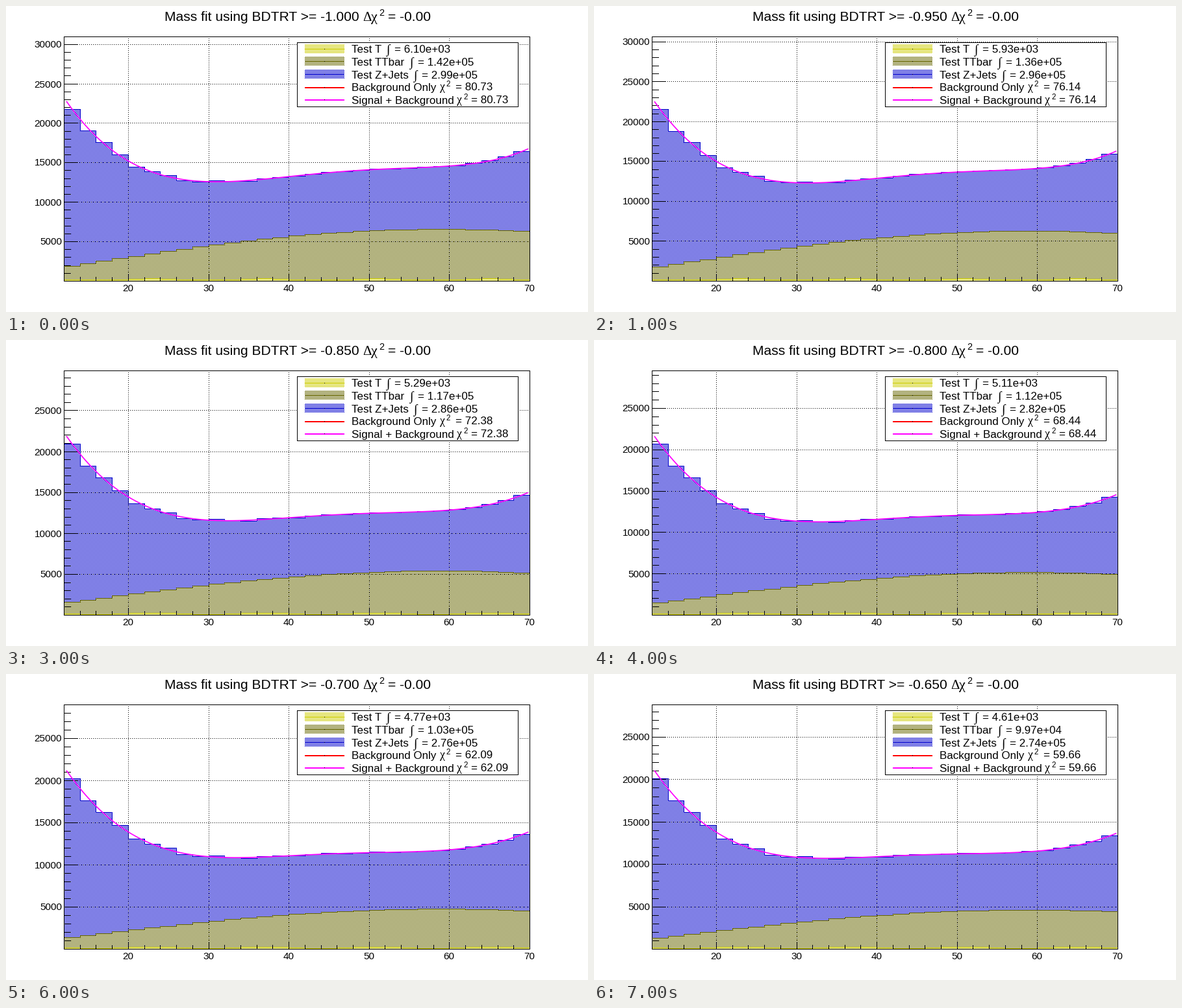
These frames come from a looping animation (896x472 px, 8 s). A matplotlib script:

```python
import numpy as np
import matplotlib.pyplot as plt
from matplotlib.animation import FuncAnimation

W, H = 896, 472
LEFT, RIGHT, TOP, BASE = 89, 806, 47, 424
BINS, STEPS = 29, 8
BLACK, WHITE = (0, 0, 0), (255, 255, 255)
BLUE, OLIVE, YELLOW = (0, 0, 204), (102, 102, 0), (204, 204, 0)
RED, MAGENTA = (255, 0, 0), (255, 0, 255)

steps = np.arange(STEPS)


def series(keys, values):
    return np.interp(steps, keys, values)


# Quantities over the scan, linear between key steps
KEYS = [0, 1, 2, 3, 5, 7]
SCALE = series([0, 2, 3, 5, 7], [.01218, .01243, .01262, .0129, .01308])
N_T = series(KEYS, [6100, 5930, 5630, 5290, 4930, 4610])
N_TT = series(KEYS, [142e3, 136e3, 127e3, 117e3, 106e3, 99.7e3])
N_Z = series(KEYS, [299e3, 296e3, 291e3, 286e3, 279e3, 274e3])
CHI2 = series(KEYS, [80.73, 76.14, 74.22, 72.38, 64.51, 59.66])
BLEND = (N_TT[0] - N_TT) / (N_TT[0] - N_TT[-1])

# Fitted curve through a few points, at the start and end of the scan
FIT_X = [93, 139, 188, 263, 337, 485, 633, 732, 803]
FIT_START = [147, 202, 238, 266, 270.5, 257.5, 249, 240.5, 220]
FIT_END = [149, 205, 243, 275, 283.5, 279, 275.5, 266, 245.5]

BIN = np.arange(BINS)
EDGES = np.rint(np.linspace(LEFT, RIGHT, BINS + 1)).astype(int)
CENTERS = (EDGES[:-1] + EDGES[1:]) / 2
yy, xx = np.mgrid[0:H, 0:W]
CHECKER = (xx + yy) % 2 == 1


def norm(x):
    return (np.asarray(x) - 448) / 355


COEFS = [np.polyfit(norm(FIT_X), y, 6) for y in (FIT_START, FIT_END)]


def fit_y(x, step):
    start, end = (np.polyval(c, norm(x)) for c in COEFS)
    return start + (end - start) * BLEND[step]


def bin_tops(step):
    """Top pixel rows of the three stacked histograms, tallest first."""
    total = fit_y(CENTERS, step) + 5 * np.exp(-BIN / 8) * np.sin(1.9 * BIN)
    growth = SCALE[step] / SCALE[0]
    double = (23 + 57 * np.sin(np.pi * BIN / 46)) * growth * N_TT[step] / N_TT[0]
    wave = 1 + .4 * np.cos(2 * np.pi * (BIN - 5) / 7)
    single = wave * N_T[step] / BINS * SCALE[step]
    return [np.rint(y).astype(int) for y in (total, BASE - double, BASE - single)]


def x_pixel(value):
    return int(round(LEFT + (value - 12) * (RIGHT - LEFT) / 58))


def y_pixel(value, step):
    return int(round(BASE - value * SCALE[step]))


def stipple(img, color, x0, x1, y0, y1):
    img[y0:y1, x0:x1] = np.where(CHECKER[y0:y1, x0:x1, None], color, WHITE)


def frame_box(img, x0, x1, y0, y1):
    img[[y0, y1], x0:x1 + 1] = BLACK
    img[y0:y1 + 1, [x0, x1]] = BLACK


def histogram(img, tops, color):
    for k, y in enumerate(tops):
        x0, x1 = EDGES[k:k + 2]
        stipple(img, color, x0, x1, y, BASE)
        img[y, x0:x1 + 1] = color
        if k:
            lo, hi = sorted((tops[k - 1], y))
            img[lo:hi + 1, x0] = color


def draw_axes(img, step):
    for value in range(12, 71, 2):
        x, major = x_pixel(value), value % 10 == 0
        img[BASE - (11 if major else 6):BASE, x] = BLACK
        if major:
            img[TOP:BASE:3, x] = BLACK
    for value in range(1000, 32000, 1000):
        y, major = y_pixel(value, step), value % 5000 == 0
        if y > TOP:
            img[y, LEFT:LEFT + (22 if major else 11)] = BLACK
            if major:
                img[y, LEFT:RIGHT:3] = BLACK
    frame_box(img, LEFT, RIGHT, TOP, BASE)


def draw_legend(img):
    img[56:156, 448:789] = WHITE
    frame_box(img, 448, 788, 56, 155)
    for y, color in ((66, YELLOW), (85, OLIVE), (105, BLUE)):
        stipple(img, color, 460, 521, y - 7, y + 7)
        img[y, 460:521] = color
        img[y, 490] = BLACK
    for y, color in ((125, RED), (144, MAGENTA)):
        img[y:y + 2, 460:521] = color
        img[y, 490] = BLACK


def draw_plot(step):
    img = np.full((H, W, 3), 255, np.uint8)
    for tops, color in zip(bin_tops(step), (BLUE, OLIVE, YELLOW)):
        histogram(img, tops, color)
    draw_axes(img, step)
    draw_legend(img)
    return img


fig = plt.figure(figsize=(W / 72, H / 72), dpi=72, facecolor="white")
ax = fig.add_axes([0, 0, 1, 1])
ax.axis("off")
picture = ax.imshow(draw_plot(0), interpolation="nearest", aspect="auto")
ax.set_xlim(-.5, W - .5)
ax.set_ylim(H - .5, -.5)
curve_x = np.linspace(93, 803, 100)
fit_line, = ax.plot([], [], color="#ff00ff", lw=1.7)


def label(x, y, s="", size=17, ha="left", font="Liberation Sans"):
    return ax.text(x, y, s, fontsize=size, ha=ha, va="baseline", family=font)


def chi_squared(x, y, size):
    label(x, y, "χ", size * 1.05, font="Liberation Serif")
    label(x + size * .58, y - size * .4, "2", size * .68)


title = label(243, 22.5, size=21)
label(549, 22.5, "Δ", 21, font="Liberation Serif")
chi_squared(562, 22.5, 21)
label(588, 22.5, "= -0.00", 21)

counts = []
for name, y, x in (("Test T", 72, 585), ("Test TTbar", 91, 621), ("Test Z+Jets", 111, 627)):
    label(532, y, name)
    label(x, y + 1, "∫", 20, font="Liberation Serif")
    counts.append(label(x + 12, y))

chi_labels = []
for name, y, x_chi, x in (("Background Only", 130, 667, 691),
                          ("Signal + Background", 150, 694, 716)):
    label(532, y, name)
    chi_squared(x_chi, y, 17)
    chi_labels.append(label(x, y))

for value in range(20, 71, 10):
    label(x_pixel(value) - .5, 440, str(value), 15.3, "center")
y_labels = [label(85.5, 0, str(v), 15.3, "right") for v in range(5000, 30001, 5000)]


def update(step):
    picture.set_data(draw_plot(step))
    fit_line.set_data(curve_x, fit_y(curve_x, step))
    title.set_text(f"Mass fit using BDTRT >= {-1 + .05 * step:.3f}")
    for text, values in zip(counts, (N_T, N_TT, N_Z)):
        text.set_text(f"= {values[step]:.2e}")
    for text in chi_labels:
        text.set_text(f"= {CHI2[step]:.2f}")
    for k, text in enumerate(y_labels, 1):
        y = y_pixel(5000 * k, step)
        text.set_y(y + 5)
        text.set_visible(y > TOP)
    return [picture, fit_line, title, *counts, *chi_labels, *y_labels]


anim = FuncAnimation(fig, update, frames=STEPS, interval=1000, repeat=True, blit=False)
plt.show()
```
